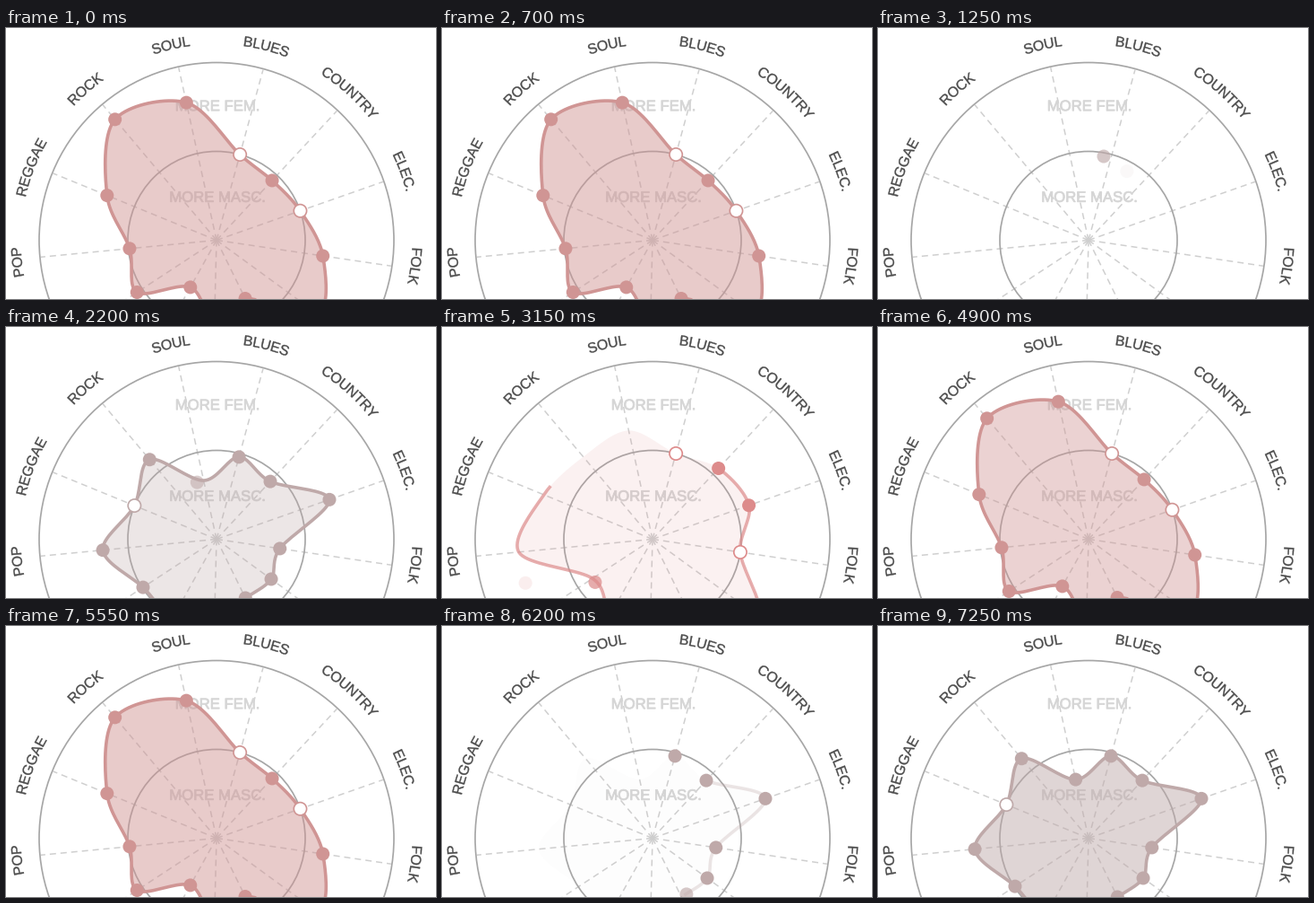
Animation of 480x302 px, one loop 7.6 s. Source, as a matplotlib script:

```python
import numpy as np
import matplotlib.pyplot as plt
from matplotlib.animation import FuncAnimation
from matplotlib.colors import to_rgba
from matplotlib.patches import Circle, PathPatch, Polygon
from matplotlib.path import Path
from matplotlib.textpath import TextPath

W, H, DPI = 480, 302, 100
PX = 72 / DPI
STEP_MS, LOOP_MS = 50, 7600

CX, CY = 235, 236.5
OUTER, INNER = 198, 99
N = 13
GAP = 2 * np.pi / N
ANGLES = np.radians(15.3) + GAP * np.arange(N)
LABELS = {0: "BLUES", 1: "COUNTRY", 2: "ELEC.", 3: "FOLK",
          9: "POP", 10: "REGGAE", 11: "ROCK", 12: "SOUL"}
FONT = {"family": "Liberation Sans"}

# Radii per spoke; a value of INNER is neutral and gets a white dot.
ROSE = ("#d09594", [99, 91, 99, 120, 140, 72.5, 92, 60, 106, 97.5, 132, 176, 157])
CORAL = ("#dd8b8b", [99, 108, 114, 99, 146, 110, 105, 95, 80, 150, 131, 120, 124])
MAUVE = ("#bfa9a9", [95, 88, 133.5, 71.5, 75.5, 73, 88, 100, 98, 127.5, 99, 116, 67])
SCENES = [(-3000, ROSE), (1250, MAUVE), (2500, CORAL), (3700, ROSE), (5800, MAUVE)]

DOT_DELAY, DOT_TIME, DOT_LEAD = 80, 140, 83
LINE_START, LINE_TIME = 215, 615
FILL_START, FILL_TIME, FILL_ALPHA = 250, 1250, 0.49
SAMPLES = 20


def polar(angle, radius):
    return np.stack([CX + radius * np.sin(angle), CY - radius * np.cos(angle)], axis=-1)


def ramp(t, start, length):
    return np.clip((t - start) / length, 0, 1)


def smooth(p):
    return p * p * (3 - 2 * p)


def closed_curve(pts):
    """Smooth closed curve that starts and ends at the second point."""
    pts = np.roll(pts, -1, axis=0)
    tan = 0.16 * (np.roll(pts, -1, axis=0) - np.roll(pts, 1, axis=0))
    s = np.linspace(0, 1, SAMPLES, endpoint=False)[:, None]
    parts = []
    for i in range(N):
        j = (i + 1) % N
        a, b, c, d = pts[i], pts[i] + tan[i], pts[j] - tan[j], pts[j]
        parts.append((1 - s) ** 3 * a + 3 * s * (1 - s) ** 2 * b
                     + 3 * s ** 2 * (1 - s) * c + s ** 3 * d)
    return np.vstack(parts + [pts[:1]])


fig = plt.figure(figsize=(W / DPI, H / DPI), dpi=DPI, facecolor="white")
ax = fig.add_axes([0, 0, 1, 1])
ax.set_xlim(0, W)
ax.set_ylim(H, 0)
ax.axis("off")


def add_glyphs(verts, codes, color, weight, z):
    ax.add_patch(PathPatch(Path(verts, codes), facecolor=color, edgecolor=color,
                           lw=weight * PX, zorder=z))


def arc_text(text, angle, base=218.5, size=16):
    glyphs = TextPath((0, 0), text, size=size, prop=FONT)
    x, y = glyphs.vertices.T
    box = glyphs.get_extents()
    turn = (x - (box.x0 + box.x1) / 2) / (base + 5.5)
    add_glyphs(polar(angle + turn, base + y), glyphs.codes, "#4c4c4c", 0.35, 6)


def flat_text(text, x, baseline, size=16.7):
    glyphs = TextPath((0, 0), text, size=size, prop=FONT)
    box = glyphs.get_extents()
    verts = glyphs.vertices * [1, -1] + [x - (box.x0 + box.x1) / 2, baseline]
    add_glyphs(verts, glyphs.codes, "#d5d5d5", 0.8, 2)


for angle in ANGLES:
    ends = np.vstack([polar(angle, 0), polar(angle, 197)])
    ax.plot(*ends.T, color="#cfcfcf", lw=1.5 * PX, dashes=(7 / 1.5, 5 / 1.5),
            dash_capstyle="butt", zorder=1)
for radius in (OUTER, INNER):
    ax.add_patch(Circle((CX, CY), radius, fill=False, ec="#a6a6a6", lw=1.7 * PX, zorder=2))
flat_text("MORE FEM.", 236, 92.2)
flat_text("MORE MASC.", 236, 193.8)
for i, label in LABELS.items():
    arc_text(label, ANGLES[i] - np.radians(0.8))

fill = ax.add_patch(Polygon([(0, 0), (1, 0), (0, 1)], lw=0, zorder=3))
line, = ax.plot([], [], lw=3.6 * PX, solid_capstyle="butt", solid_joinstyle="round", zorder=4)
dots = ax.scatter(np.zeros(2 * N), np.zeros(2 * N), linewidths=0, zorder=5)


def update(frame):
    now = frame * STEP_MS
    start, (color, radii) = [s for s in SCENES if s[0] <= now][-1]
    t = now - start
    radii = np.array(radii)
    neutral = radii == INNER
    curve = closed_curve(polar(ANGLES, radii))

    fill.set_xy(curve)
    fill.set_facecolor(to_rgba(color, FILL_ALPHA * smooth(ramp(t, FILL_START, FILL_TIME))))

    drawn = ramp(t, LINE_START, LINE_TIME)
    line.set_data(*curve[:int(round(drawn * N * SAMPLES)) + 1].T)
    line.set_color(to_rgba(color, drawn))

    # Each dot swings in clockwise from half a spoke behind.
    age = t + DOT_LEAD - DOT_DELAY * np.arange(N)
    p = ramp(age, 0, DOT_TIME)
    pos = polar(ANGLES - GAP / 2 * (1 - smooth(p)), radii)
    alpha = np.where(age > 0, np.minimum(1, p + 0.05), 0)
    outer = np.tile(to_rgba(color), (N, 1))
    outer[:, 3] = alpha
    inner = np.ones((N, 4))
    inner[:, 3] = alpha * neutral
    widths = np.concatenate([np.where(neutral, 16, 15), np.full(N, 12.6)])
    dots.set_offsets(np.vstack([pos, pos]))
    dots.set_sizes((widths * PX) ** 2)
    dots.set_facecolors(np.vstack([outer, inner]))
    return fill, line, dots


anim = FuncAnimation(fig, update, frames=LOOP_MS // STEP_MS, interval=STEP_MS,
                     repeat=True, repeat_delay=0, blit=False)
plt.show()
```
